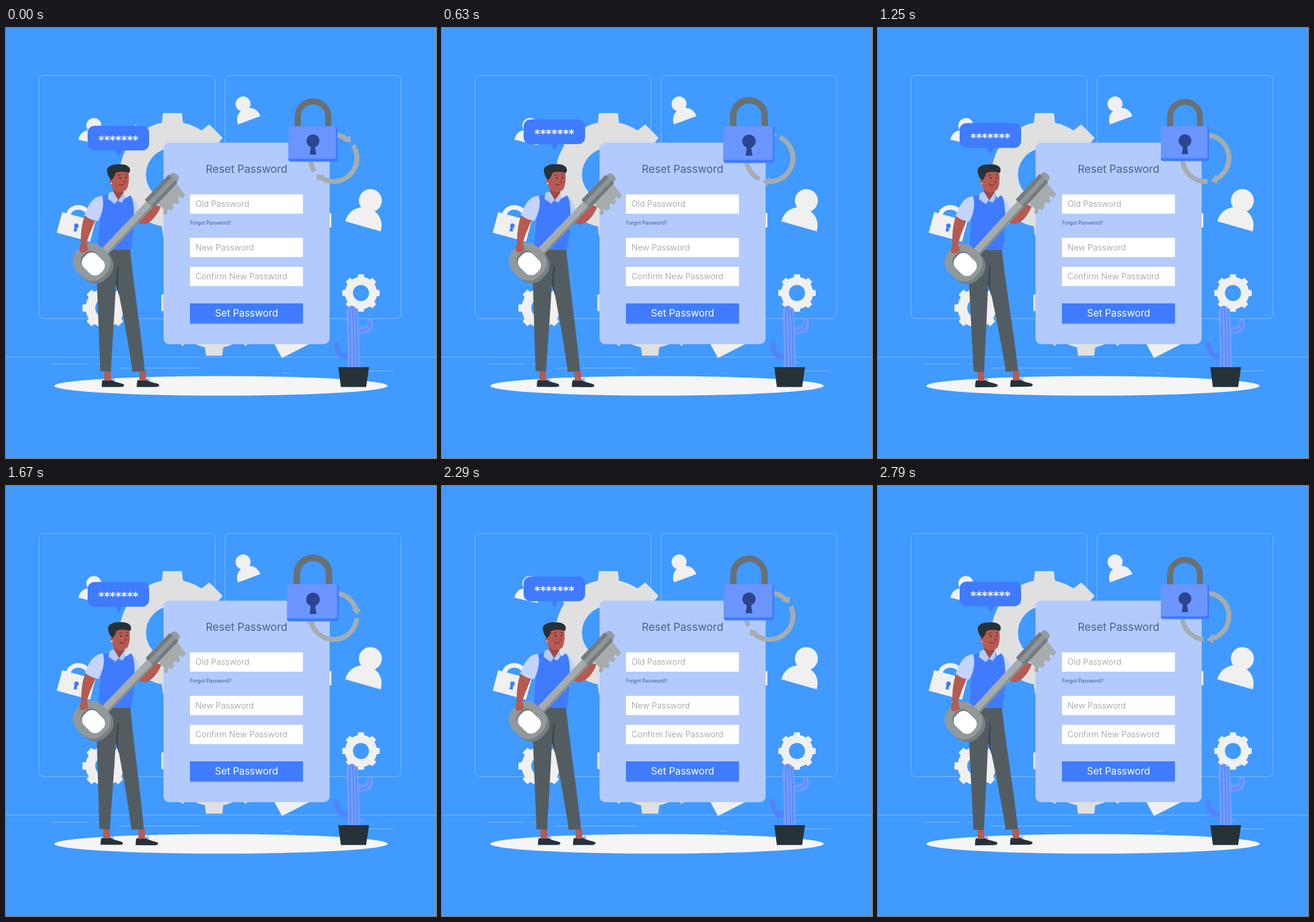
Recreate the animation shown at these times as an HTML page. Size 748 px wide and 748 px high, loop 2.83 s.

```html
<!DOCTYPE html>
<html lang="en">
<head>
<meta charset="utf-8">
<title>Reset password</title>
<style>
html, body { margin: 0; width: 100%; height: 100%; overflow: hidden; background: #409aff; }
svg { display: block; width: 100vw; height: 100vh; }
text { font-family: Inter, "Open Sans", sans-serif; }
.hint { font-size: 14.6px; font-weight: 300; fill: #999; }
.wall { fill: none; stroke: #fff; stroke-opacity: .45; stroke-width: .8; }
</style>
</head>
<body>
<svg viewBox="0 0 748 748">
  <defs>
    <g id="user"><path d="M-32 0C-32-44 32-44 32 0Z"/><circle cy="-46.6" r="20"/></g>
    <g id="arrow">
      <path d="M39.9 7A40.5 40.5 0 0 1-39.6 8.4" fill="none" stroke="#a6acaf" stroke-width="8.5"/>
      <path d="M-41-1L-48.5 9L-32 10Z" fill="#a6acaf"/>
    </g>
    <rect id="bow" x="-32" y="-30" width="64" height="60" rx="26"/>
    <rect id="eyelet" x="-20" y="-16" width="40" height="32" rx="13"/>
    <g id="foot">
      <path d="M171 596H182L183 614H171Z" fill="#b55b52"/>
      <path d="M168 612C172 614 180 614 184 612C190 617 200 617 205 620Q207 624 200 624.5H166.5Q166 618 168 612Z" fill="#263238"/>
      <path d="M181 613L188 609L187 613L190 614M183 610L189 612" fill="none" stroke="#7f93ee"/>
    </g>
  </defs>

  <!-- room -->
  <g class="wall">
    <rect x="57.5" y="82.5" width="306" height="423" rx="8"/>
    <rect x="381" y="82.5" width="306" height="423" rx="8"/>
    <path d="M0 572.5H748M79 584.5H143M156 584.5H164M197 591.5H337M482 600.5H495M624 596.5H673M605 582.5H622"/>
  </g>
  <ellipse cx="374" cy="622.5" rx="290" ry="17" fill="#f5f5f5"/>

  <g id="gears"></g>
  <g fill="#f0f0f0">
    <use href="#user" transform="translate(423 160.5) rotate(-20.5) scale(.65)"/>
    <use href="#user" transform="translate(621 345) rotate(16)"/>
    <use href="#user" transform="translate(146 199) rotate(13) scale(.65)"/>
    <path d="M467 550L480 574L529 549ZM555 322H566V347H555Z"/>
    <g transform="translate(122 346) rotate(15)">
      <rect x="-30" y="-18.5" width="60" height="37"/>
      <path d="M-18.5-17V-18A18.5 16.5 0 0 1 18.5-18V-17" fill="none" stroke="#f0f0f0" stroke-width="8"/>
      <path d="M-2 0H2L3 8H-3Z" fill="#407bff"/>
      <circle cy="-2" r="4" fill="#407bff"/>
    </g>
  </g>

  <!-- form -->
  <rect x="274" y="199.5" width="289" height="350.5" rx="10" fill="#b3caff"/>
  <text x="418.5" y="251.5" font-size="18.8" text-anchor="middle" fill="#4d6283">Reset Password</text>
  <rect x="320" y="481" width="196.5" height="34" fill="#7592d8"/>
  <g fill="#fff">
    <rect x="320" y="289.5" width="196.5" height="33.5"/>
    <rect x="320" y="365" width="196.5" height="33.5"/>
    <rect x="320" y="415.5" width="196.5" height="33.5"/>
    <rect x="320" y="479" width="196.5" height="34" fill="#407bff"/>
  </g>
  <text class="hint" x="329.5" y="311">Old Password</text>
  <text x="320" y="341.5" font-size="8.5" fill="#45577d">Forgot Password?</text>
  <text class="hint" x="329.5" y="386.5">New Password</text>
  <text class="hint" x="329.5" y="437">Confirm New Password</text>
  <text x="418.5" y="501.5" font-size="17" text-anchor="middle" fill="#fff">Set Password</text>

  <!-- padlock -->
  <g id="ring"><use href="#arrow"/><use href="#arrow" transform="rotate(180)"/></g>
  <g id="lock">
    <path d="M508 173V154A26 25.5 0 0 1 560 154V173" fill="none" stroke="#697074" stroke-width="10.5"/>
    <rect x="492" y="171" width="84" height="60.5" rx="4" fill="#407bff"/>
    <rect x="492" y="171" width="81" height="55.5" rx="3" fill="#6b95ff"/>
    <circle cx="534" cy="196" r="11" fill="#2c4590"/>
    <path d="M531 202H537L539.5 219.5H528.5Z" fill="#2c4590"/>
  </g>

  <!-- cactus -->
  <path d="M596 577C580 579 573 570 570 552C570 543 578 542 580 549C581 562 586 567 596 565Z" fill="#5386fb"/>
  <path d="M610 533L632 530C640 525 639 512 637 507Q630 504 628 508V517L610 521Z" fill="#6f99ff"/>
  <path d="M594 590C596 560 593 520 592 500C592 488 596 483 601 483C608 483 611 490 612 500C616 530 614 560 616 590Z" fill="#749dff"/>
  <path d="M599 486C596 520 601 550 599 590M602 485C606 520 604 550 606 590M607 489C612 520 609 550 611 590M633 509C632 520 632 524 616 527M575 549C577 565 584 572 594 571" fill="none" stroke="#477cf5" stroke-width="1.3"/>
  <path d="M578 590H631.5L626.5 624.5H582.5Z" fill="#263238"/>

  <!-- man with key -->
  <g id="man">
    <use href="#foot"/><use href="#foot" x="61"/>
    <path d="M186 386H216C220 430 236 540 241.5 597L220 598C212 540 198 470 190 430Z" fill="#535d61"/>
    <path d="M189 400L197 418Q193 440 197 467L189 440Z" fill="#3f484c"/>
    <path d="M160 385L158 440L164 597L182.5 598C184 560 191 470 191 440L197 386Z" fill="#535d61"/>

    <path d="M225 331C235 330 247 318 258 306L269 311C263 326 252 339 241 341.5Q232 341 225 336Z" fill="#b55b52"/>
    <path d="M216 291C225 297 230 308 234 322L222 329Z" fill="#c3d4ff"/>
    <path d="M170 292C164 300 167 310 165 322C162 345 161 365 160 386H217C222 360 224 330 222 310Q221 296 216 291L196 304L186 289Z" fill="#407bff"/>
    <path d="M167 292C150 293 142 310 136 327Q146 335 160 336C167 325 172 305 167 292Z" fill="#c3d4ff"/>

    <path d="M186 274V290L195 301L205 288L203 278Z" fill="#9c4a43"/>
    <path d="M179 287L186 284L195 299L189 306L177 297ZM195 300L205 286L206 297L201 304Z" fill="#b3caff"/>
    <g transform="translate(-1.5 0)">
      <path d="M187 249C183 262 183 273 188 281C196 288 206 286 211 281C216 273 216 258 214 247Z" fill="#b55b52"/>
      <circle cx="185.5" cy="266" r="4.3" fill="#b55b52"/>
      <circle cx="184.5" cy="270" r="1" fill="#fff"/>
      <path d="M178 252C174 243 184 236 198 237C211 236 221 242 216 252Q202 248 192 252C191 258 188 261 185 265Q179 259 178 252Z" fill="#263238"/>
      <path d="M207 262L210 269L206 270Z" fill="#c02f33"/>
      <path d="M197 271Q201 275 206 272M196 257L201 255M208 255L212 255" fill="none" stroke="#502722"/>
      <circle cx="200" cy="261" r="1.4" fill="#263238"/>
      <circle cx="210" cy="260.5" r="1.4" fill="#263238"/>
    </g>

    <path d="M262 304L296 270L312 290.5L306.5 297L302 293L299 297L302 302L298 307L293 304L290 308L292 313L286 318L283 315L280 318L281 322L277 325.5L273 322L275 316Z" fill="#a6acae"/>
    <g transform="translate(151 409) rotate(-46.6)">
      <rect x="28" y="-6" width="122" height="15" fill="#a6acae"/>
      <rect x="28" y="5.500" width="122" height="3.5" fill="#888f91"/>
      <rect x="190" y="-8" width="22" height="17" rx="6" fill="#969c9e"/>
      <rect x="142" y="-10" width="61" height="21" rx="2" fill="#747b7e"/>
      <rect x="142" y="-3" width="61" height="8" fill="#8e9597"/>
    </g>
    <use href="#bow" transform="translate(154 411.5) rotate(45)" fill="#787f82"/>
    <use href="#bow" transform="translate(149 407) rotate(45)" fill="#92999b"/>
    <use href="#eyelet" transform="translate(150 407.5) rotate(45)" fill="#737a7d"/>
    <use href="#eyelet" transform="translate(152 410.5) rotate(45)" fill="#fff"/>
    <path d="M137 326C131 342 130 360 130 376Q126 385 129 390Q136 393 143 386L140 375C144 360 150 348 155 335Q145 333 137 326Z" fill="#b55b52"/>
  </g>

  <!-- speech bubble -->
  <g id="bubble">
    <path d="M189 211H203L196 224Z" fill="#407bff"/>
    <rect x="142" y="170" width="107" height="43" rx="12" fill="#407bff"/>
    <text x="195.5" y="201" text-anchor="middle" fill="#fff" style="font:bold 19px 'DejaVu Sans',sans-serif">*******</text>
  </g>
</svg>
<script>
const $ = id => document.getElementById(id);
const LOOP = 2830, FRAME = 41.62, CYCLE = 1500;

function gear(x, y, R, color) {
  const tooth = `M${-.18 * R} ${-.78 * R}L${-.154 * R} ${-R}H${.154 * R}L${.18 * R} ${-.78 * R}Z`;
  let s = `<g transform="translate(${x} ${y})" fill="${color}">` +
    `<circle r="${.645 * R}" fill="none" stroke="${color}" stroke-width="${.43 * R}"/>`;
  for (let a = 0; a < 360; a += 45) s += `<path d="${tooth}" transform="rotate(${a})"/>`;
  return s + '</g>';
}
$('gears').innerHTML = gear(289.5, 255, 107, '#e0e0e0') + gear(362, 478, 92, '#e0e0e0') +
  gear(172, 487, 39, '#f0f0f0') + gear(617.5, 461, 32.5, '#f0f0f0');

// Two beats per cycle, as [time, strength] points joined by lines
const beats = [[-50, 0], [180, 1], [420, 0], [700, 1], [880, 0], [1450, 0], [1680, 1]];
function beat(p) {
  const i = beats.findIndex(b => b[0] > p);
  const [t0, v0] = beats[i - 1], [t1, v1] = beats[i];
  return v0 + (v1 - v0) * (p - t0) / (t1 - t0);
}

function draw() {
  const t = Math.floor(performance.now() % LOOP / FRAME + .05) * FRAME;
  const p = t % CYCLE, k = p / CYCLE;
  $('ring').setAttribute('transform', `translate(570 226.5) rotate(${-44 + .24 * t})`);
  $('lock').setAttribute('transform',
    `translate(534 177.5) scale(${1 + .08 * beat(p)}) translate(-534 -177.5)`);
  $('man').setAttribute('transform', `rotate(${.9 * Math.sin(2 * Math.PI * k)} 213 430)`);
  $('bubble').setAttribute('transform', `translate(0 ${-13.3 * (1 - Math.abs(1 - 2 * k))})`);
  requestAnimationFrame(draw);
}
draw();
</script>
</body>
</html>
```
